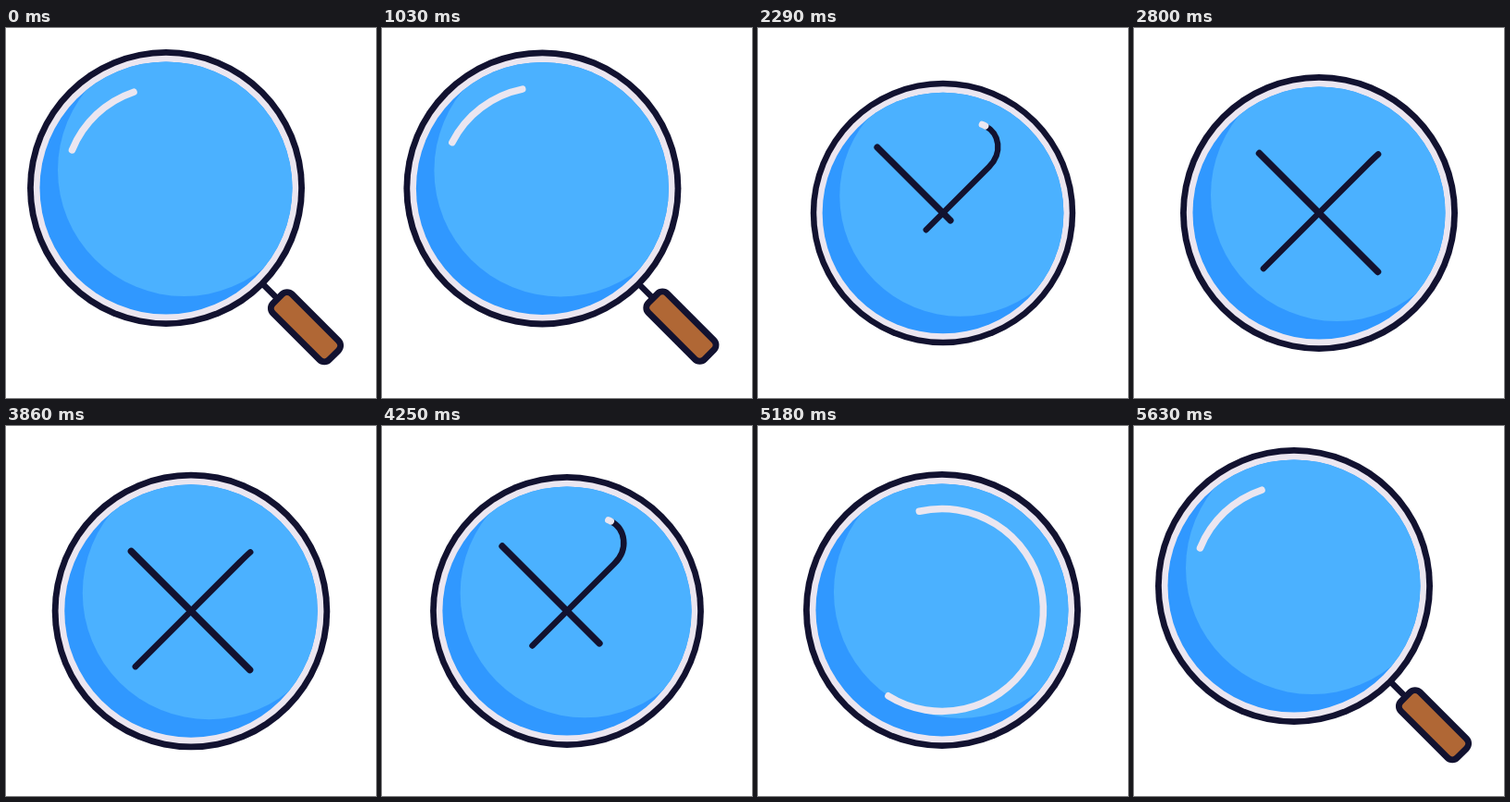
Write an HTML page with a canvas that moves like this. It is 400 px wide and 400 px high and loops after 5.66 s.

```html
<!DOCTYPE html>
<html lang="en">
<head>
<meta charset="utf-8">
<title>Search to close</title>
<style>
  html, body { margin: 0; width: 100%; height: 100%; overflow: hidden; background: #fff; }
  canvas { display: block; width: 400px; height: 400px; }
</style>
</head>
<body>
<canvas id="stage" width="400" height="400"></canvas>
<script>
const ctx = document.getElementById('stage').getContext('2d');
const NAVY = '#121230', PALE = '#ebe6f0', BLUE = '#4bb1ff', DEEP = '#3098ff', WOOD = '#b06735';
const LOOP = 5660, STEP = 30, STEPS = 60, OPEN_AT = 1030, CLOSE_AT = 3860;
const TAU = Math.PI * 2, RAD = Math.PI / 180;

// Keys are [step, value, slope]; cubic Hermite between them.
function track(keys, t) {
  const last = keys[keys.length - 1];
  if (t <= keys[0][0]) return keys[0][1];
  if (t >= last[0]) return last[1];
  const i = keys.findIndex(k => k[0] > t);
  const [t0, v0, m0 = 0] = keys[i - 1], [t1, v1, m1 = 0] = keys[i];
  const d = t1 - t0, u = (t - t0) / d, u2 = u * u, u3 = u2 * u;
  return v0 + (v1 - v0) * (3 * u2 - 2 * u3) + d * (m0 * (u3 - 2 * u2 + u) + m1 * (u3 - u2));
}

// Cubic easing with both handles flat, at x1 and x2.
function ease(x1, x2, x) {
  if (x <= 0) return 0;
  if (x >= 1) return 1;
  let lo = 0, hi = 1;
  for (let i = 0; i < 24; i++) {
    const s = (lo + hi) / 2, q = 1 - s;
    if (3 * q * q * s * x1 + 3 * q * s * s * x2 + s * s * s < x) lo = s; else hi = s;
  }
  return lo * lo * (3 - 2 * lo);
}

const mix = (a, b, u) => a + (b - a) * u;

const glintTail = [[0, 202], [1, 207, 9], [15, 617, 33], [23, 854, 20], [46, 1014.5]];
const glintHead = [[0, 251.4], [1, 258.6, 12], [15, 842, 34], [23, 1016]];
const pulse = [[38, 1], [43, 0.955], [51, 1.053], [60, 1]];
const hookReveal = [[31, 0], [46, 186, 6]];
const hookEnd = [[46, -38, -3], [58, -60]];
const unbend = [[46, 0], [55, 1]];
const slashTail = [[34, -84], [46, -71, 0.8], [58, -64.5]];
const slashHead = [[34, -84], [46, 35.5, 5], [58, 63.5]];

function disc(x, y, r, color) {
  ctx.fillStyle = color;
  ctx.beginPath();
  ctx.arc(x, y, r, 0, TAU);
  ctx.fill();
}

function stroke(color, width) {
  ctx.strokeStyle = color;
  ctx.lineWidth = width;
  ctx.stroke();
}

function drawHandle(k) {
  const shift = -85 * ease(0.33, 0.67, k / 20);
  ctx.save();
  ctx.translate(324 + shift, 323.2 + shift);
  ctx.rotate(Math.PI / 4);
  ctx.beginPath();
  ctx.moveTo(-74, 0);
  ctx.lineTo(-40, 0);
  stroke(NAVY, 6.5);
  ctx.beginPath();
  ctx.roundRect(-43, -14.5, 86, 29, 7.5);
  ctx.fillStyle = WOOD;
  ctx.fill();
  stroke(NAVY, 7);
  ctx.restore();
}

function drawLens() {
  disc(0, 0, 150, NAVY);
  disc(0, 0, 143.2, PALE);
  disc(0, 0, 136.5, DEEP);
  ctx.save();
  ctx.beginPath();
  ctx.arc(0, 0, 136.5, 0, TAU);
  ctx.clip();
  disc(19.5, -19.5, 136.5, BLUE);
  ctx.restore();
}

function drawGlint(k) {
  if (k > 47) return;
  ctx.beginPath();
  ctx.arc(0, 0, 109.5, track(glintTail, k) * RAD, track(glintHead, k) * RAD);
  stroke(PALE, 7.5);
}

function drawHook(k) {
  const length = track(hookReveal, k);
  if (length <= 0) return;
  const u = track(unbend, k), end = track(hookEnd, k);
  ctx.save();
  if (k < 46) ctx.setLineDash([length, 1000]);
  ctx.beginPath();
  ctx.moveTo(mix(48, 64, u), mix(-98.4, -63.5, u));
  ctx.bezierCurveTo(mix(64, 60, u), mix(-90, -60, u), mix(68, 56, u), mix(-68, -56, u), 52, -52);
  ctx.lineTo(end, -end);
  stroke(NAVY, 6.6);
  ctx.restore();
}

function drawSlash(k) {
  const a = track(slashTail, k), b = track(slashHead, k);
  if (b <= a) return;
  ctx.beginPath();
  ctx.moveTo(a, a);
  ctx.lineTo(b, b);
  stroke(NAVY, 7.4);
}

function draw(k) {
  ctx.fillStyle = '#fff';
  ctx.fillRect(0, 0, 400, 400);
  ctx.lineCap = 'round';
  if (k < 20) drawHandle(k);
  const center = mix(173, 200, ease(0.25, 0.2, k / 20)), scale = track(pulse, k);
  ctx.save();
  ctx.translate(center, center);
  ctx.scale(scale, scale);
  drawLens();
  drawSlash(k);
  drawHook(k);
  drawGlint(k);
  ctx.restore();
}

// Plays forward, holds, then runs backward.
function stepAt(ms) {
  if (ms < OPEN_AT) return 0;
  if (ms < CLOSE_AT) return Math.min(STEPS, 1 + Math.floor((ms - OPEN_AT) / STEP));
  return Math.max(0, STEPS - 1 - Math.floor((ms - CLOSE_AT) / STEP));
}

const start = performance.now();
function tick() {
  draw(stepAt((performance.now() - start) % LOOP));
  requestAnimationFrame(tick);
}
tick();
</script>
</body>
</html>
```
